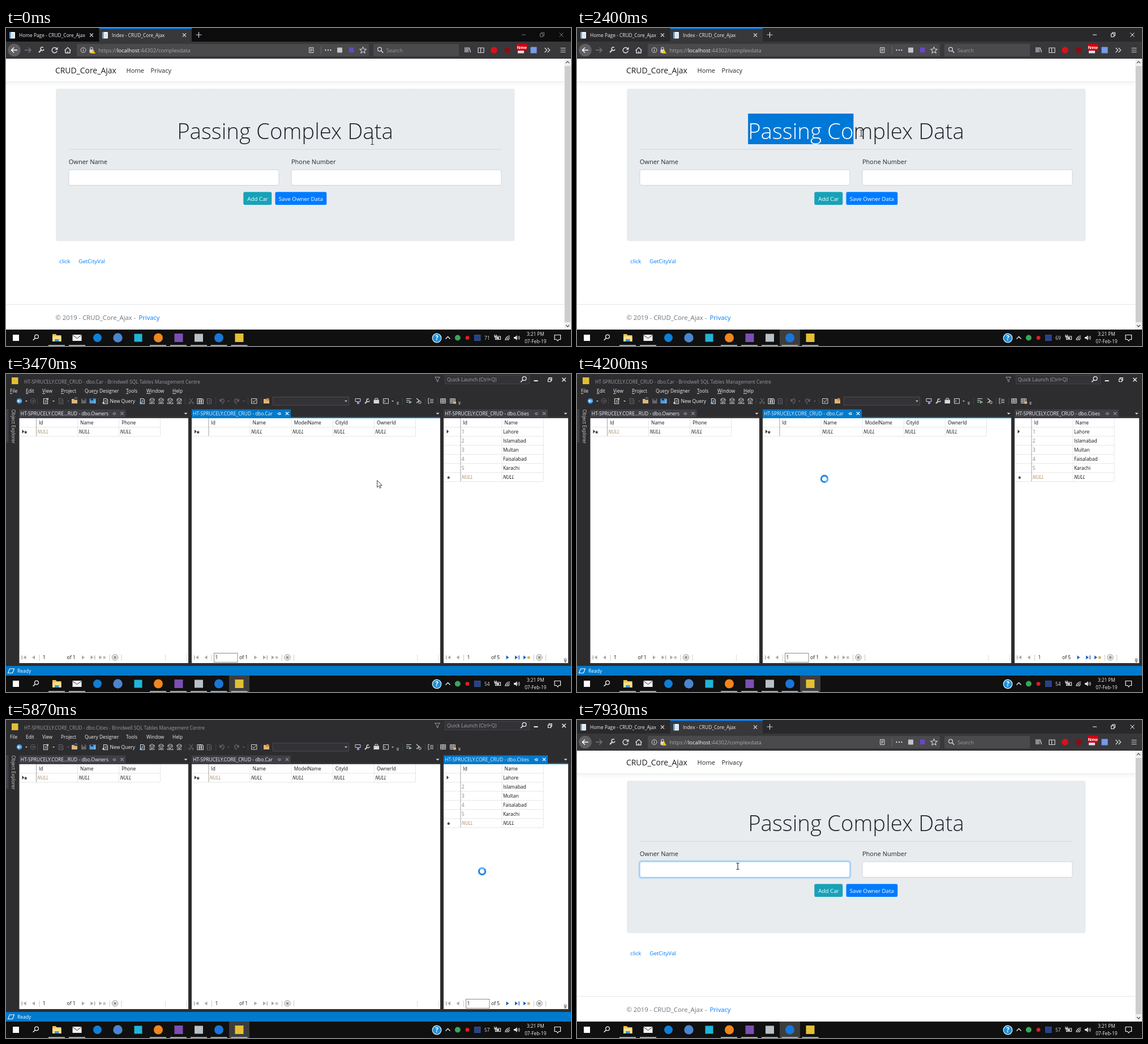
An HTML page for the animation above (8000 ms loop, 998 by 561 pixels).

```html
<!DOCTYPE html>
<html lang="en">
<head>
<meta charset="utf-8">
<title>Passing Complex Data</title>
<style>
html, body { margin: 0; width: 100%; height: 100%; overflow: hidden; background: #fff; }
svg { display: block; width: 998px; height: 561px; font-family: "Open Sans", "Noto Sans", sans-serif; }
.hide, .pane.on .cold, .pane:not(.on) .hot { display: none; }
.alt .key { text-decoration: underline; }
#strip { fill: #0c0c0d; }
#controls { opacity: .45; }
.focus #strip { fill: #29292b; }
.focus #controls { opacity: 1; }
</style>
</head>
<body>
<svg id="stage" viewBox="0 0 998 561" xmlns="http://www.w3.org/2000/svg"></svg>
<script>
const LOOP = 8000;
const HOST = 'HT-SPRUCELY.CORE_CRUD';
const SUITE = 'Brindwell SQL Tables Management Centre';

// Shape helpers
const rect = (x, y, w, h, fill, more = '') => `<rect x="${x}" y="${y}" width="${w}" height="${h}" fill="${fill}" ${more}/>`;
const disc = (x, y, r, fill, more = '') => `<circle cx="${x}" cy="${y}" r="${r}" fill="${fill}" ${more}/>`;
const line = (d, color, w = 1, more = '') => `<path d="${d}" fill="none" stroke="${color}" stroke-width="${w}" ${more}/>`;
const area = (d, fill, more = '') => `<path d="${d}" fill="${fill}" ${more}/>`;
const text = (x, y, s, size, fill, more = '') => `<text x="${x}" y="${y}" font-size="${size}" fill="${fill}" ${more}>${s}</text>`;
const group = (id, body, more = '') => `<g id="${id}" ${more}>${body}</g>`;
const cross = (x, y, r, color, w = 1) => line(`M${x - r} ${y - r}l${2 * r} ${2 * r}m0 ${-2 * r}l${-2 * r} ${2 * r}`, color, w);
const caret = (x, y, r, fill) => area(`M${x - r} ${y - r / 2}h${2 * r}l${-r} ${r}z`, fill);
const lens = (x, y, color, w = 1.3) => disc(x + 1, y - 1, 3.4, 'none', `stroke="${color}" stroke-width="${w}"`) + line(`M${x - 1.5} ${y + 1.5}l-3.8 3.8`, color, w + .3);
const middle = 'text-anchor="middle"';

function windowButtons(xs, y, color) {
  const [a, b, c] = xs;
  return line(`M${a - 3} ${y}h7`, color) +
    line(`M${b - 3.5} ${y - 2}h5v5.5h-5zM${b - 1.5} ${y - 2}v-2h5v5.5h-2`, color) + cross(c, y, 3.5, color);
}

function browserTop() {
  const ink = '#d7d7db', dim = '#8f8f93';
  const page = x => rect(x, 7, 9.5, 11.5, '#f4f7fa', 'rx="1"') + rect(x, 7, 2.5, 11.5, '#6aa9d8') +
    line(`M${x + 4} 10.5h4M${x + 4} 13h4M${x + 4} 15.5h4`, '#9db4c6', .8);
  const tab = (x, s) => page(x + 6.5) + text(x + 23, 16.3, s, 8.4, '#f0f0f2') + cross(x + 151, 12.5, 3, ink, 1.1);
  return '<rect id="strip" width="998" height="24"/>' +
    rect(164.5, 0, 163.5, 24, '#38383b') + rect(164.5, 0, 163.5, 1.5, '#0a84ff') +
    tab(0, 'Home Page - CRUD_Core_Ajax') + tab(164, 'Index - CRUD_Core_Ajax') +
    line('M335.5 12h10M340.5 7v10', ink, 1.2) +
    group('controls', windowButtons([914, 947, 981], 12, '#fff')) +
    rect(0, 24, 998, 30, '#38383b') + rect(0, 53, 998, 1, '#1c1c1e') +
    disc(14.5, 39, 11.3, '#606064') + line('M20 39H9.5M14 34.5L9.5 39l4.5 4.5', '#fff', 1.5) +
    line('M33 39h11M39.5 34.5l4.5 4.5l-4.5 4.5', '#77777a', 1.4) +
    line('M58 43l5-5', ink, 2.4) + line('M66 34.5a3 3 0 1 0 1 3', ink, 1.6) +
    line('M89.5 36.5a4.6 4.6 0 1 0 .7 4', ink, 1.5) + area('M91.5 33.5v5h-5z', ink) +
    line('M103.5 39.5l5.5-5l5.5 5M105 39v5h8v-5M109 44v-3', ink, 1.5) +
    rect(125, 28, 516, 22, '#4a4a4d', 'rx="2"') +
    disc(136.5, 39, 4.4, 'none', `stroke="${ink}" stroke-width="1"`) + line('M136.5 38v3.5M136.5 36v1', ink, 1.1) +
    rect(147.5, 38, 7, 6, ink, 'rx="1"') + line('M149 38v-2a2 2 0 0 1 4 0v2', ink, 1.2) + area('M154 38l4 7h-8z', '#ffbf00') +
    text(163.5, 43, 'https://<tspan fill="#f9f9fa">localhost</tspan>:44302/complexdata', 9.5, '#a9a9ac') +
    line('M535.5 34.5h7.5v9h-7.5zM537 37h4.5M537 39h4.5M537 41h3', ink) + line('M556.5 32v14', '#66666a') +
    [564.5, 569, 573.5].map(x => disc(x, 39, 1.2, ink)).join('') +
    rect(585, 34.5, 9, 9, '#c4c4c8', 'rx="1"') + rect(606, 34.5, 8.5, 8.5, '#6a45c9') +
    line('M630.5 33.5l1.6 3.6l4 .4l-3 2.7l.9 4l-3.5-2.1l-3.5 2.1l.9-4l-3-2.7l4-.4z', ink, 1.1) +
    rect(649, 28, 151, 22, '#4a4a4d', 'rx="2"') + `<g transform="translate(1322 0) scale(-1 1)">${lens(661, 38.5, ink)}</g>` +
    text(672, 43, 'Search', 9.2, '#98989b') +
    line('M811 34v9M813.5 34v9M816 34v9M818 34.5l2.5 8.5', ink, 1.3) +
    line('M834 35h10v8.5h-10zM838.5 35v8.5', ink, 1.2) + disc(862, 39, 5.8, '#d8121d') + disc(886, 39, 5.3, '#8c0d14') +
    rect(904, 36, 11, 8.5, '#d9e4ee') + rect(902, 28, 18.5, 12, '#d4000f', 'rx="2"') +
    text(911.3, 37.2, 'New', 7.8, '#fff', middle + ' font-weight="700"') +
    rect(926.5, 33.5, 11, 11, '#7899ea') +
    line('M951.5 35l4 4l-4 4M956.5 35l4 4l-4 4', ink, 1.3) + line('M979.5 35.5h9M979.5 39h9M979.5 42.5h9', ink, 1.2);
}

function webPage() {
  const ink = '#212529', blue = '#007bff';
  const field = x => rect(x + .5, 250, 371, 27.5, '#fff', 'rx="3" stroke="#ced4da"');
  const title = (id, fill) => text(493, 195.5, 'Passing Complex Data', 38.4, fill, `${middle} font-weight="300" id="${id}"`);
  return rect(0, 54, 986, 478, '#fff') +
    '<linearGradient id="shade" x2="0" y2="1"><stop stop-opacity=".04"/><stop offset="1" stop-opacity="0"/></linearGradient>' +
    rect(0, 95, 986, 8, 'url(#shade)') + rect(0, 94.3, 986, .8, '#e3e5e7') +
    text(87, 80.4, 'CRUD_Core_Ajax', 13.9, '#1b1e21') + text(212.5, 79, 'Home', 11.1, ink) + text(255.5, 79, 'Privacy', 11.1, ink) +
    rect(88, 107, 810.5, 269, '#e9ecef', 'rx="4"') +
    title('heading', ink) +
    '<clipPath id="picked"><rect id="pick" y="151" height="54"/></clipPath>' +
    group('marked', rect(300, 151, 390, 54, '#0078d7') + title('lit', '#fff'), 'clip-path="url(#picked)"') +
    rect(111, 213.6, 764, .9, '#d0d3d6') +
    text(110.8, 240, 'Owner Name', 11, ink) + text(504, 240, 'Phone Number', 11, ink) +
    field(110.5) + field(503.5) +
    group('glow', rect(109.8, 248.8, 373.3, 30, 'none', 'rx="4" stroke="#b9d9f9" stroke-width="3"') +
      rect(111, 250, 371, 27.5, '#fff', 'rx="3" stroke="#80bdff"')) +
    rect(120, 256, 1, 16, '#222', 'id="insert"') +
    rect(419.3, 289.3, 50, 22.7, '#17a2b8', 'rx="2.5"') + text(444.4, 304.5, 'Add Car', 9.8, '#fff', middle) +
    rect(475.5, 289.3, 90.8, 22.7, blue, 'rx="2.5"') + text(520.8, 304.5, 'Save Owner Data', 9.75, '#fff', middle) +
    text(94, 415, 'click', 9.75, blue) + text(128.3, 415, 'GetCityVal', 9.75, blue) +
    rect(0, 487, 986, .9, '#dee2e6') + text(87.5, 515, '© 2019 - CRUD_Core_Ajax -', 11.3, '#6c757d') + text(234.5, 515, 'Privacy', 11.2, blue) +
    rect(986, 54, 12, 478, '#f0f0f0') + rect(987, 67, 10, 452, '#cdcdcd') +
    line('M989 62l3-3l3 3M989 524l3 3l3-3', '#505050', 1.3);
}

// Data panes: left and right edge, tab width, headers
const PANES = [
  { name: 'Owners', x: 23.5, end: 322, tab: 188, label: 'HT-SPRUCELY.CORE...RUD - dbo.Owners', cols: ['Id', 'Name', 'Phone'], count: 1 },
  { name: 'Car', x: 328, end: 767, tab: 175, cols: ['Id', 'Name', 'ModelName', 'CityId', 'OwnerId'], count: 1 },
  { name: 'Cities', x: 773, end: 993, tab: 184, cols: ['Id', 'Name'], count: 5,
    rows: ['Lahore', 'Islamabad', 'Multan', 'Faisalabad', 'Karachi'] }
];

function navBar(p) {
  const x = p.x, live = p.count > 1 ? '#1c62b9' : '#a8a8a8', off = '#a8a8a8';
  const tri = (cx, dir, c) => area(`M${cx - 2.5 * dir} 496.5l${5 * dir} 3.5l${-5 * dir} 3.5z`, c);
  const bar = (dx, c) => rect(x + dx, 496.5, 1.4, 7, c);
  const seps = [35, 159, 180].map(d => rect(x + d, 495, 1, 11, '#c9c9c9')).join('');
  return bar(4, off) + tri(x + 9.5, -1, off) + tri(x + 25, -1, off) + seps +
    rect(x + 39.5, 492.5, 41.5, 16, '#fff', 'class="hot" stroke="#8a8a8a"') +
    text(x + 41.5, 503.3, '1', 8.5, '#111') + text(x + 84, 503.3, 'of ' + p.count, 8.5, '#111') +
    tri(x + 113, 1, live) + tri(x + 128.5, 1, live) + bar(132.5, live) + tri(x + 143.5, 1, live) +
    rect(x + 148, 498, 4.5, 4.5, p.count > 1 ? '#e3b15a' : '#c4c4c4') +
    disc(x + 169, 500, 5.2, '#eee', 'stroke="#999"') + rect(x + 166.8, 497.8, 4.5, 4.5, '#999') +
    (p.count > 1 ? line('M985.5 503h5M985.5 505.5h5', '#333') + caret(988, 508, 2, '#333')
      : rect(p.end - 41, 495, 1, 11, '#ddd') + rect(p.end - 3, 495, 1, 11, '#ddd'));
}

function pane(p) {
  const rows = p.rows || [], x = p.x, first = x + 29.5, step = 73.1;
  const right = first + step * p.cols.length, bottom = 109.5 + 16 * rows.length;
  const chip = (kind, fill) => rect(x, 62.5, p.tab, 15, fill, `class="${kind}"`) + rect(x, 76, p.end - x, 2, fill, `class="${kind}"`);
  const colX = i => first + i * step;
  let s = chip('cold', '#3f3f46') + chip('hot', '#007acc') +
    text(x + 2.3, 73.2, p.label || `${HOST} - dbo.${p.name}`, 8.45, '#f4f4f4') +
    ['cold', 'hot'].map(k => {
      const c = k == 'hot' ? '#fff' : '#929298', tx = x + p.tab;
      return `<g class="${k}">${line(`M${tx - 24} 70h3m0-2.5v5m0-4h3v3h-3`, c)}${cross(tx - 6.5, 69.7, 2.7, c, 1.2)}</g>`;
    }).join('') + caret(p.end - 4.5, 70, 3, '#ddd') + rect(x, 78, p.end - x, 432, '#fff');
  for (let y = 93.5; y <= bottom; y += 16) s += rect(x, y, right - x, .8, '#dfdfdf');
  p.cols.forEach((c, i) => {
    s += rect(colX(i + 1), 78, .8, bottom - 78, '#dfdfdf') + text(colX(i) + 5, 89, c, 8.4, '#111');
  });
  s += rect(first, 78, .9, bottom - 78, '#9a9a9a');
  const cell = (col, row, v, fill, more = '') => text(colX(col) + 2.3, 105 + 16 * row, v, 8.45, fill, more);
  rows.forEach((v, i) => {
    s += cell(0, i, i + 1, '#808080', i ? '' : 'class="cold"') + cell(1, i, v, '#111');
  });
  p.cols.forEach((c, i) => {
    s += cell(i, rows.length, 'NULL', i ? '#111' : '#a58a60', 'font-style="italic"' + (i || rows.length ? '' : ' class="cold"'));
  });
  const lx = rows.length ? x + 5.5 : x + 5;
  s += area(`M${lx} 98l3.5 3.5l-3.5 3.5z`, '#333') +
    text(rows.length ? x + 6 : x + 8.5, bottom - 1.5, '*', 10, '#222', 'font-weight="700"');
  return group('pane' + p.name, s + navBar(p), 'class="pane"');
}

function toolbar() {
  const ink = '#d8d8d8', dim = '#66666b', blue = '#75bdf5', gold = '#dcb67a';
  const doc = (x, c = ink) => line(`M${x - 3.5} 43.5h5l2 2v7h-7zM${x - 1.5} 47h3.5M${x - 1.5} 49.5h3.5`, c, 1.1);
  const cube = (x, s) => line(`M${x - 4} 44.5l4-2l4 2v3l-4 2l-4-2zM${x - 4} 44.5l4 2l4-2`, ink, .9) +
    text(x, 53, s, 4, ink, middle + ' font-weight="700"');
  const disk = (x, c) => rect(x - 4, 43.5, 8.5, 8.5, c) + rect(x - 2, 43.5, 4.5, 3, '#2d2d30');
  const folder = (x, c) => area(`M${x - 5} 44h4l1 1.5h5v6.5h-10z`, c);
  const sheet = x => line(`M${x - 4.5} 43.5h9v8h-9zM${x - 4.5} 46h9M${x - 1.5} 43.5v8M${x + 1.5} 43.5v8M${x - 4.5} 48.7h9`, ink, .9);
  const seps = [55, 163, 316, 370, 427, 450, 700, 740, 762];
  return disc(23.5, 47.7, 4.8, '#3f9be8') + line('M26.5 47.7h-5.5m2-2.2l-2.2 2.2l2.2 2.2', '#fff', 1.1) +
    [36, 84, 110, 393, 420, 683].map(x => caret(x, 48, 2, x > 390 && x < 425 || x == 110 ? dim : ink)).join('') +
    disc(47.5, 47.7, 4.3, 'none', `stroke="${dim}"`) + line('M45 47.7h5m-2-2l2 2l-2 2', dim) +
    doc(70) + disc(73.5, 44, 1.8, gold) + doc(97, dim) + folder(121, gold) + line('M121 43l3-1.5l2 2', blue) +
    disk(137, dim) + disk(154, blue) + disk(151.5, '#4a9ee0') + doc(176) + disc(172, 51, 1.8, ink) +
    text(183.5, 51, 'New Query', 8.6, '#f1f1f1') + doc(241) + disc(238, 51, 1.8, blue) +
    ['MDX', 'DMX', 'XMLA', 'DAX'].map((s, i) => cube(258 + i * 16, s)).join('') +
    line('M324 43l5 7M330 43l-5 7', dim, 1.1) + disc(324, 51, 1.5, 'none', `stroke="${dim}"`) + disc(330, 51, 1.5, 'none', `stroke="${dim}"`) +
    doc(341.5) + doc(345) + doc(359, dim) +
    line('M378 44v4h4M378.5 47.5q4-6 6.5-2q1.5 4-4 7', dim, 1.4) + line('M411 44v4h-4M410.5 47.5q-4-6-6.5-2q-1.5 4 4 7', dim, 1.4) +
    line('M433.5 43.5h9.5v8.5h-9.5zM435.5 47l2 3l4-5', ink) + folder(460, gold) + disc(462, 45, 2.6, '#d98b3a') +
    rect(471.5, 40.5, 134, 14.5, '#333337', 'stroke="#4a4a50"') + caret(600.5, 48, 2.5, ink) +
    line('M617 43.5h9v5h-9z', ink) + rect(620, 48, 4, 5, '#b180d7') + line('M634 52l4-4', ink, 2) + line('M641 44.5a2.5 2.5 0 1 0 1 2.5', ink, 1.5) +
    rect(649.5, 45.5, 9.5, 6.5, ink) + line('M652 45v-2h4.5v2', ink) + line('M666.5 43.5h9v8.5h-9zM668 46l2 1.8l-2 1.8', ink) +
    line('M707 43.5h9M707 46.5h5M707 49.5h4', ink) + area('M712 46.5l5 3l-5 3z', '#7cc47c') +
    line('M725 43l5 4l-5 4', ink, 1.2) + disc(731, 50, 2.2, 'none', `stroke="${ink}"`) +
    line('M748 43h-2v9h2M749 45h6M749 47.7h6M749 50.5h6', ink) + sheet(772) + sheet(789) + rect(790, 49, 5, 3.5, gold) +
    [692, 801].map(x => line(`M${x - 2} 50h4`, ink) + caret(x, 53, 2, ink)).join('') +
    seps.map(x => rect(x, 42, .8, 12, '#46464a')).join('');
}

function studio() {
  const ink = '#f1f1f1';
  const menu = [[7, '&File'], [35, '&Edit'], [64, '&View'], [97, '&Project'], [139, 'Que&ry Designer'], [212, '&Tools'], [248, '&Window'], [294, '&Help']]
    .map(([x, s]) => text(x, 33, s.replace(/&(.)/, '<tspan class="key">$1</tspan>'), 8.3, ink)).join('');
  return rect(0, 0, 998, 516, '#2d2d30') + rect(10, 6, 11.5, 12, '#e3bf35') +
    text(32, 16.5, '', 8.42, '#9b9b9f', 'id="caption"') +
    line('M757.5 5.5h9l-3.5 4.5v4l-2-1.5v-2.5z', '#9b9b9f') +
    rect(775.5, 2.5, 149, 15, '#333337', 'stroke="#434346"') + text(779, 13, 'Quick Launch (Ctrl+Q)', 8.65, '#a5a5a8') + lens(914.5, 9, ink) +
    rect(932.5, 11, 7, 2, ink) + line('M957.5 9h5v4.5h-5zM959 9V6.7h5v4.5h-1.5', ink, 1.2) + cross(985.5, 10, 3.2, ink, 1.4) +
    menu + toolbar() + rect(0, 62, 4.5, 59, '#3f3f46') +
    text(0, 0, 'Object Explorer', 8.4, '#d0d0d0', 'transform="translate(9.5 62.5) rotate(90)"') +
    PANES.map(pane).join('') +
    rect(0, 515, 998, 17, '#007acc') + line('M6.5 520h8l-3 7.5h-8z', '#fff', 1.1) + text(20, 527, 'Ready', 8.5, '#fff');
}

function taskbar() {
  const ink = '#f2f2f2';
  return rect(0, 532, 998, 29, '#101010') + rect(0, 532, 36, 29, '#fff', 'id="hot" opacity=".19"') +
    [75, 111, 254, 290, 326, 361.5, 397.5].map(x => rect(x, 559.3, 29, 1.7, '#a9bfd0')).join('') +
    rect(12, 541, 11, 11, '#fff') + lens(53, 545.5, ink) +
    area('M82 540h6l1.5 2h8v11h-15.5z', '#f3c64b') + rect(82, 544, 15.5, 9, '#ffe08a') + rect(86, 549, 7.5, 4, '#3b99d8') +
    rect(117.5, 541, 16, 11, ink) + line('M117.5 541.5l8 6l8-6', '#333') +
    disc(161.5, 546.5, 7.5, '#0f7fd6') + disc(197.5, 546.5, 8.2, '#4a86cf') + rect(226.5, 539.5, 14, 14, '#20b5d8') +
    disc(269, 546.5, 8, '#f2851d') + rect(297.5, 539, 15, 15, '#7c4fb3') +
    rect(333, 539.5, 15, 14, '#b9c1c7') + disc(376, 546.5, 8, '#1976d8') + rect(404.5, 539, 15, 15, '#e3bf35') +
    disc(761, 547, 7.8, '#1d8fd8', 'stroke="#e8f4fb" stroke-width="1.2"') + text(761, 551.3, '?', 11.5, '#fff', middle + ' font-weight="700"') +
    line('M776.5 548.5l4-4l4 4', ink, 1.3) + disc(797.8, 546.5, 5, '#36a85a') + disc(815, 546.5, 3.5, '#d81f1f') +
    rect(827.5, 541.5, 10.5, 10, '#23418f', 'stroke="#4a5f9c" stroke-width=".7"') +
    text(849.7, 549.8, '', 8.2, '#e0e0e0', middle + ' id="meter"') +
    line('M864.5 544h9v5.5h-9z', ink, 1.1) + rect(866, 545.5, 5, 2.8, ink) + line('M863 541v4h3v-4', ink, 1.2) +
    line('M882 551a8 8 0 0 1 8-8M884.5 551a5.5 5.5 0 0 1 5.5-5.5M887 551a3 3 0 0 1 3-3', ink, 1.2) +
    area('M897 545h2.5l3-3v9l-3-3h-2.5z', ink) + line('M904 544.5q1.5 2 0 4M906 543q2.5 3.5 0 7', ink) +
    text(935.3, 542.5, '3:21 PM', 8.3, ink, middle) + text(935.3, 555.5, '07-Feb-19', 8.3, ink, middle) +
    line('M969 541.5h10.5v8h-3l-2 2.5l-2-2.5h-3.5z', ink, 1.2);
}

function pointers() {
  return group('arrow', area('M0 0V12.3L2.9 9.6L4.8 13.8L6.6 13L4.8 9H8.7Z', '#fff', 'stroke="#111" stroke-width=".8"')) +
    group('beam', line('M-2.5 -5.5h2L0 -5l.5-.5h2M0 -5V5M-2.5 5.5h2L0 5l.5.5h2', '#111', 1)) +
    group('busy', disc(0, 0, 5.6, '#fff', 'stroke="#2489e6" stroke-width="3.2"') + line('M0 -5.6A5.6 5.6 0 0 1 5.6 0', '#6db8f7', 3, 'id="arc"'));
}

const $ = id => document.getElementById(id);
const stage = $('stage');
stage.innerHTML = group('browser', browserTop() + webPage()) + group('studio', studio()) + taskbar() + group('cursor', pointers());

// Timed tables: [ms, value...]
const PATH = [[0, 647, 200], [330, 647, 200], [1130, 653, 205], [1270, 653, 205], [1900, 314, 182], [2000, 314, 182],
  [2070, 321, 183], [2730, 682, 188], [3400, 682, 188], [4060, 437, 185], [4350, 437, 185], [4600, 201.5, 197.5],
  [4670, 201.5, 197.5], [4730, 307.5, 294.5], [4930, 307.5, 294.5], [5600, 951, 361], [5670, 951, 361], [5730, 839, 265],
  [5840, 839, 265], [5870, 841, 267], [6000, 841, 267], [6330, 690, 233], [6470, 713.5, 231], [6540, 713.5, 231], [7230, 284, 258], [LOOP, 284, 258]];
const SHAPE = [[0, 'beam'], [3330, 'arrow'], [4100, 'busy'], [4350, 'arrow'], [4600, 'busy'], [4930, 'arrow'],
  [5870, 'busy'], [6000, 'arrow'], [7130, 'beam'], [7400, ''], [7670, 'beam']];
const ACTIVE = [[0, 'Car'], [4600, 'Owners'], [5600, 'Cities']];
const METER = [[0, 71], [730, 70], [1400, 69], [2430, 54], [5270, 57]];
const TASK = [[0, -40], [1870, 358], [3330, 394], [6470, -40], [6600, 358]];

const at = (table, t) => table.filter(row => row[0] <= t).pop()[1];
const within = (t, a, b) => t >= a && t < b;
const show = (id, on) => $(id).classList.toggle('hide', !on);

function place(t) {
  const i = PATH.findIndex(p => p[0] > t);
  const [a, x, y] = PATH[i - 1], [b, u, v] = PATH[i];
  const k = (t - a) / (b - a);
  return [x + (u - x) * k, y + (v - y) * k];
}

const heading = $('heading');
const left = heading.getStartPositionOfChar(0).x;
const glyphs = [...heading.textContent].map((c, i) => [heading.getStartPositionOfChar(i).x, heading.getEndPositionOfChar(i).x]);

function draw(t) {
  const [x, y] = place(t), tables = within(t, 3330, 6470), kind = at(SHAPE, t), active = at(ACTIVE, t);
  show('browser', !tables);
  show('studio', tables);
  stage.classList.toggle('focus', t >= 2040);
  stage.classList.toggle('alt', t < 4400);
  $('caption').textContent = `${HOST} - dbo.${active} - ${SUITE}`;
  PANES.forEach(p => $('pane' + p.name).classList.toggle('on', p.name == active));
  $('meter').textContent = at(METER, t);
  $('hot').setAttribute('x', at(TASK, t));

  const marking = within(t, 2050, 2930);
  show('marked', marking);
  if (marking) {
    const edge = glyphs.reduce((e, [a, b]) => (a + b) / 2 < x ? b : e, left);
    $('pick').setAttribute('x', left);
    $('pick').setAttribute('width', edge - left);
  }
  show('glow', t >= 7400);
  show('insert', within(t, 7400, 7930));

  ['arrow', 'beam', 'busy'].forEach(k => show(k, k == kind));
  $('cursor').setAttribute('transform', `translate(${x} ${y})`);
  $('arc').setAttribute('transform', `rotate(${t * .36 % 360})`);
}

const start = performance.now();
function tick() {
  draw((performance.now() - start) % LOOP);
  requestAnimationFrame(tick);
}
tick();
</script>
</body>
</html>
```
